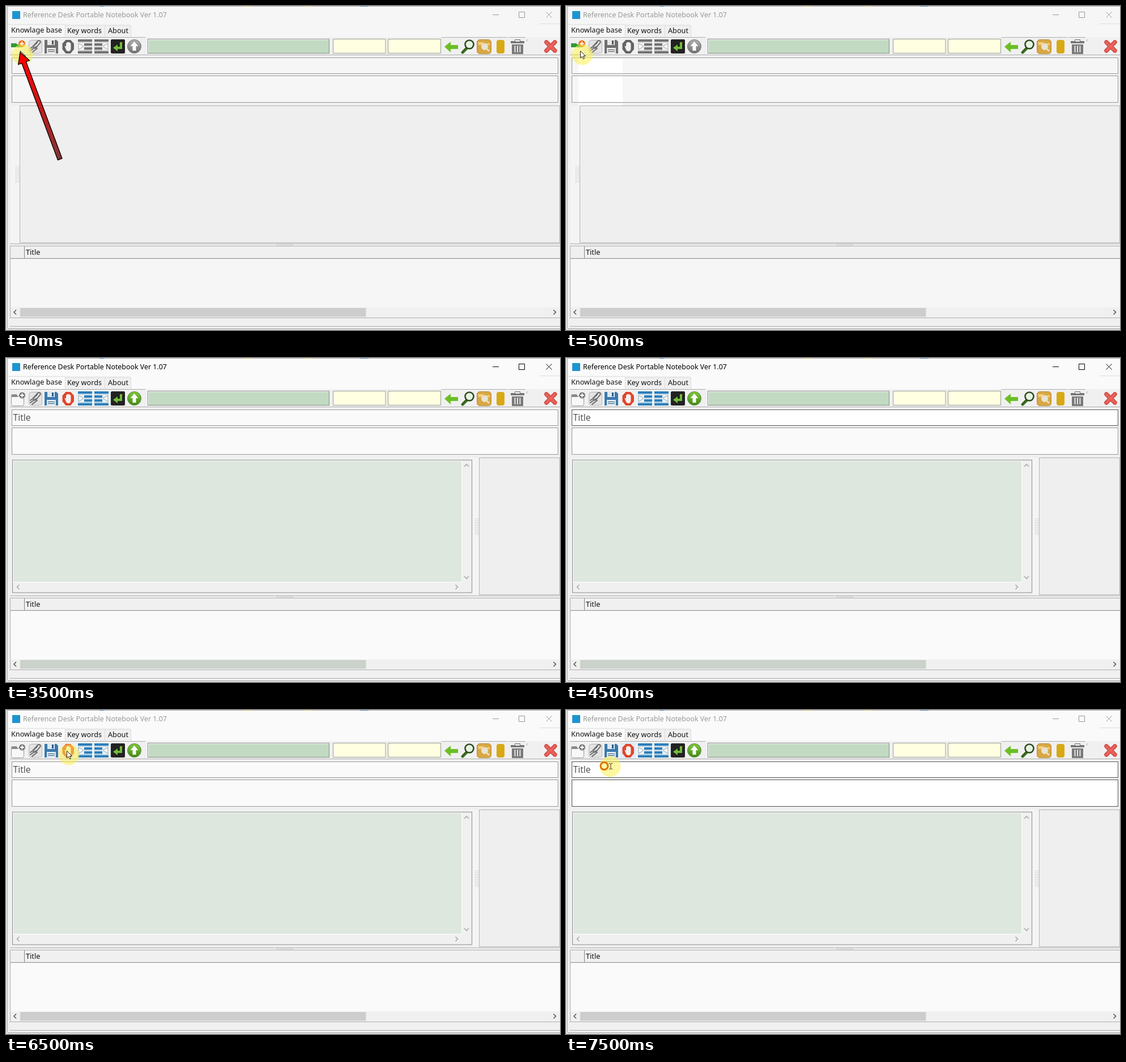
An HTML page that plays this animation: 978x573 px, repeating every 8 s.

```html
<!DOCTYPE html>
<html lang="en">
<head>
<meta charset="utf-8">
<title>Reference Desk Portable Notebook</title>
<style>
html, body { margin: 0; width: 100%; height: 100%; overflow: hidden; background: #f0f0f0; }
svg { display: block; width: 978px; height: 573px; }
text { font: 12.7px "Noto Sans", "Open Sans", sans-serif; fill: #111; }
.caption { font-size: 12.4px; fill: var(--ink); }
.ctl { stroke: var(--ink); fill: none; }
.paper { fill: var(--paper); }
.field { fill: var(--field); stroke: var(--edge); }
.head { fill: var(--field1); stroke: var(--edge1); }
.thumb { fill: var(--thumb); }
.tint { filter: grayscale(var(--grey)); }
.panel { fill: #efefef; stroke: #b4b4b4; }
.line { stroke: #adadad; fill: none; }
.chev { fill: none; stroke: #555; stroke-width: 1.6; }
.soft { stroke: #aaa; }
.grip { stroke: #aaa; stroke-dasharray: 1 2; fill: none; }
</style>
</head>
<body>
<svg id="stage" viewBox="0 0 978 573">
  <defs>
    <linearGradient id="shaft" x2="0" y2="1">
      <stop offset=".1" stop-color="#f00"/><stop offset="1" stop-color="#803838"/>
    </linearGradient>
    <linearGradient id="leaf" x2="0" y2="1">
      <stop stop-color="#83c93a"/><stop offset="1" stop-color="#3d8a14"/>
    </linearGradient>
    <path id="pointer" d="M0 0V12.5L2.9 9.8L5 14.3L7 13.4L5 9H9Z" fill="#fff" stroke="#222"/>
    <g id="bars">
      <path d="M0 0H25V4H0ZM11 7H25V11H11ZM11 14H25V18H11ZM0 21H25V25H0Z" fill="#2c80bc"/>
      <path d="M0 5H25M11 12H25M11 19H25M0 20H25" stroke="#79b3da"/>
    </g>
  </defs>

  <!-- window -->
  <rect width="978" height="573" fill="#f0f0f0"/>
  <rect class="paper" x="4" y="1" width="974" height="31"/>
  <rect class="paper" x="220" y="32" width="758" height="23"/>
  <rect class="paper" x="4" y="32" width="100" height="23"/>
  <path class="line" d="M0 .5H978"/>
  <path d="M165 .5h8M625 .5h15" stroke="#3b7fc4"/>
  <path d="M420 .5h12M527 .5h12" stroke="#d8c25a"/>
  <rect width="3" height="573" fill="#e6e6e6"/>
  <path class="line" d="M2.500 0V570"/>
  <rect x="11" y="9" width="14" height="14" fill="#1d93cf"/>
  <text class="caption" x="30" y="20">Reference Desk Portable Notebook Ver 1.07</text>
  <path class="ctl" d="M859 15.500H870M905.500 10.500h10v10h-10ZM953.500 10.500l10 10M963.500 10.500l-10 10"/>

  <!-- tabs -->
  <path d="M104.500 33V54M174.500 35V54M220.500 35V54M4 32.500H104M105 34.500H220M942 31.500H978" fill="none" stroke="#dcdcdc"/>
  <text x="9" y="47">Knowlage base</text>
  <text x="108" y="48">Key words</text>
  <text x="180" y="48">About</text>

  <!-- toolbar -->
  <path class="line" d="M7 55.500H246M769 55.500H886M888 55.500H917M919.500 59v4M7 86.500H978"/>
  <g data-on="2"><rect x="8" y="57" width="28" height="29" fill="#dcebf7"/></g>
  <g data-on="7"><rect x="96" y="57" width="27" height="29" fill="#e0ecf6"/></g>
  <g data-on="012">
    <rect x="10" y="65" width="22" height="20" rx="2" fill="#fcfcfc" stroke="#ddd"/>
    <path d="M9 66h9l2 2h10v5H9Z" fill="#2f9a34"/>
    <circle cx="28" cy="66.500" r="6" fill="#ee7420"/>
    <path d="M24.500 66.500h7M28 63v7" stroke="#fff" stroke-width="2"/>
  </g>
  <g data-on="34567">
    <path d="M9.500 66.500q0-2 2-2h7l2 3h11v14q0 3-3 3H12.500q-3 0-3-3Z" fill="#f8f8f8" stroke="#999"/>
    <path d="M10 65h9l2 4H10Z" fill="#8a8a8a"/>
    <circle cx="28.500" cy="66" r="5.500" fill="#777"/>
    <path d="M25 66h7M28.500 62.500v7" stroke="#fff" stroke-width="2"/>
  </g>
  <rect x="40.500" y="60.500" width="23" height="23" rx="4" fill="#e3e3e3" stroke="#b5b5b5"/>
  <g fill="none" stroke="#6c6c6c" stroke-linecap="round">
    <path d="M43 75l7-5M43 79l10-7M46 82l9-7" stroke-width="2"/>
    <path d="M48 71l8-9q4-2 5 2l-8 10q-5 2-5-3l7-6" stroke-width="2"/>
  </g>
  <g class="tint">
    <path d="M68 60h21l3 3v21H68Z" fill="#3a79ae"/>
    <path d="M73 60h13v9H73ZM72 74h16v10H72Z" fill="#dce9f2"/>
    <path d="M81 61h3v7h-3ZM74 77h12v1H74ZM74 80h12v1H74Z" fill="#315a7a"/>
  </g>
  <g class="tint">
    <path d="M105.500 60h8.500l6 6.500v10l-6 7.500h-8.500l-6-7.500v-10Z" fill="#e0452c"/>
    <path d="M106 67q0-2 1.500-2 1-2 2.500-1 1.500-1 2.500 1 2 0 2 2v8q0 5-4 5t-5-4l-2-5q1-1 2.500 1Z" fill="#f6f0ee"/>
  </g>
  <g class="tint">
    <use href="#bars" x="127" y="59"/>
    <path d="M128 66l9 5.500-9 5.500Z" fill="#f4f8fa" stroke="#86a9bf"/>
  </g>
  <g class="tint">
    <use href="#bars" transform="translate(181 59) scale(-1 1)"/>
    <path d="M180 66l-9 5.500 9 5.500Z" fill="#f4f8fa" stroke="#86a9bf"/>
  </g>
  <rect x="185" y="59" width="25" height="25" rx="2" fill="#222"/>
  <path d="M203 64v10h-7" fill="none" stroke="#71bd36" stroke-width="4"/>
  <path d="M189 74l8-6v12Z" fill="#71bd36"/>
  <g class="tint">
    <circle cx="226.500" cy="71.500" r="12" fill="url(#leaf)" stroke="#55813a"/>
    <path d="M226.500 63l7 8h-4v8h-6v-8h-4Z" fill="#fff"/>
  </g>
  <rect x="250.500" y="58.500" width="320" height="25" fill="#fff" stroke="#8a8a8a"/>
  <rect x="252" y="60" width="318" height="23" fill="#c1dac1"/>
  <path d="M577.500 58.500h92.500v25h-92.500ZM674.500 58.500h93v25h-93Z" fill="#ffffe1" stroke="#9b9b9b"/>
  <path d="M774 72l11-9v6h13v7H785v6Z" fill="#6cbf25"/>
  <path d="M813 75l-7 7" stroke="#356b1c" stroke-width="5" stroke-linecap="round"/>
  <circle cx="818" cy="68" r="7.500" fill="#e8f2e2" stroke="#2f4b22" stroke-width="2.600"/>
  <rect x="831.500" y="59.500" width="25" height="25" rx="5" fill="#d9a845" stroke="#b98a35"/>
  <path d="M834 64h8l2 2h10v3H834Z" fill="#f1d084"/>
  <circle cx="845" cy="72" r="5" fill="#dfe5e4" stroke="#f3e2b8" stroke-width="2"/>
  <path d="M849 76l4 4" stroke="#f3e2b8" stroke-width="2.500"/>
  <rect x="866" y="60" width="14" height="24" rx="4" fill="#d9a914"/>
  <path d="M891 62h7v-3h10v3h7v4H891ZM893 68h20v17H893Z" fill="#777"/>
  <path d="M900 62h6v-1h-6ZM898.500 70v12M903 70v12M907.500 70v12" stroke="#e6e6e6" stroke-width="2"/>
  <g stroke-linecap="round">
    <path d="M954 64l15 15M969 64l-15 15" stroke="#cf4c47" stroke-width="7.500"/>
    <path d="M954 64l15 15M969 64l-15 15" stroke="#e8625c" stroke-width="4.500"/>
  </g>

  <!-- text fields -->
  <rect class="head" x="10.500" y="91.500" width="964" height="28"/>
  <rect class="field" x="10.500" y="123.500" width="964" height="47"/>
  <g data-on="1"><path d="M22 92h78v27H22ZM22 124h78v46H22Z" fill="#fff"/></g>
  <g data-on="12"><rect x="22" y="172" width="78" height="4" fill="#f9f9f9"/></g>
  <g data-on="34567"><text x="12.500" y="111" style="font-size:15.600px;fill:#555">Title</text></g>

  <!-- middle area -->
  <g data-on="012">
    <rect x="8" y="177" width="16" height="242" fill="#f4f4f4"/>
    <rect class="panel" x="24.500" y="176.500" width="953" height="242"/>
    <path class="grip" d="M17.500 284v30M20 284v30M22.500 284v30"/>
  </g>
  <g data-on="34567">
    <rect x="11.500" y="180.500" width="811" height="234.500" fill="#f0f0f0" stroke="#8c8c8c"/>
    <rect x="12" y="181" width="793" height="216" fill="#fff"/>
    <rect x="13" y="182" width="791" height="214" fill="#dee7de"/>
    <path class="chev soft" d="M809 192l4-4 4 4M809 386l4 4 4-4M23.500 401l-4 4 4 4M793.500 401l4 4-4 4"/>
    <rect x="824" y="177" width="11" height="242" fill="#f4f4f4"/>
    <path class="grip" d="M828.500 284v30M831 284v30M833.500 284v30"/>
    <rect class="panel" x="835.500" y="176.500" width="142" height="242"/>
  </g>
  <path class="line" d="M7 420.500H978"/>
  <path class="grip" d="M478 421.500h29M478 423.500h29"/>

  <!-- list -->
  <rect class="paper" x="8" y="425" width="970" height="108"/>
  <rect x="8" y="425" width="970" height="22" fill="#f0f0f0"/>
  <path d="M8 446.500H978M32.500 425V446" stroke="#858585"/>
  <path class="line" d="M978 424.500H7.500V551.500H978"/>
  <text x="35" y="440">Title</text>
  <rect class="thumb" x="25" y="534" width="610.500" height="15.500"/>
  <path class="chev" d="M18 537.500l-4 4 4 4M966.500 537.500l4 4-4 4"/>
  <path class="line" d="M7 566.500H978M3 570.500H978"/>
  <rect y="571" width="978" height="2" fill="#dedede"/>

  <!-- mouse -->
  <circle id="spot" r="18.500" fill="#fbf04f" opacity=".54"/>
  <g data-on="2"><circle cx="25" cy="71" r="6.500" fill="none" stroke="#df3d20" stroke-width="3"/></g>
  <g data-on="7">
    <circle cx="67.500" cy="99" r="6.500" fill="none" stroke="#e2700c" stroke-width="3"/>
    <path d="M76 94.500h2l1 1 1-1h2M79 95v9M76 104.500h2l1-1 1 1h2" fill="none" stroke="#333"/>
  </g>
  <g data-on="0126"><use id="hand" href="#pointer"/></g>
  <g data-on="0">
    <path transform="translate(25 82) rotate(-20.400)" d="M0 0L10.500 19H4V201.500H-4V19H-10.500Z" fill="url(#shaft)" stroke="#100" stroke-width="1.400"/>
  </g>
</svg>
<script>
const LOOP = 8000;
const idle = { paper: "#f6f6f6", field: "#f6f6f6", field1: "#f6f6f6", edge: "#999", edge1: "#999",
  ink: "#989898", thumb: "#cdcdcd", grey: 1 };
const edit = { ...idle, paper: "#fafafa", field: "#fafafa", field1: "#fafafa", grey: 0 };
const live = { ...edit, ink: "#000", thumb: "#cbd1cb" };

// start time, look, centre of the mouse highlight
const steps = [
  [0, idle, [29, 86]],
  [500, idle, [29, 86]],
  [2500, { ...idle, field: "#fdfdfd", field1: "#fdfdfd" }, [101, 100]],
  [3500, live],
  [4500, { ...live, field1: "#fff", edge1: "#555" }],
  [5500, edit],
  [6500, edit, [111, 79]],
  [7500, { ...edit, field: "#fff", field1: "#fff", edge: "#555", edge1: "#555" }, [78, 100]]
];

const stage = document.getElementById("stage");
const spot = document.getElementById("spot");
const hand = document.getElementById("hand");
const layers = [...stage.querySelectorAll("[data-on]")];
let shown = -1;

function show(i) {
  const [, look, at] = steps[i];
  for (const key in look) stage.style.setProperty("--" + key, look[key]);
  for (const el of layers) el.style.display = el.dataset.on.includes(i) ? "" : "none";
  spot.style.display = at ? "" : "none";
  if (at) {
    spot.setAttribute("transform", `translate(${at})`);
    hand.setAttribute("transform", `translate(${at[0] - 3.5} ${at[1] - 6.5})`);
  }
  shown = i;
}

function tick() {
  const t = performance.now() % LOOP;
  const i = steps.findLastIndex(s => s[0] <= t);
  if (i !== shown) show(i);
  requestAnimationFrame(tick);
}
tick();
</script>
</body>
</html>
```
